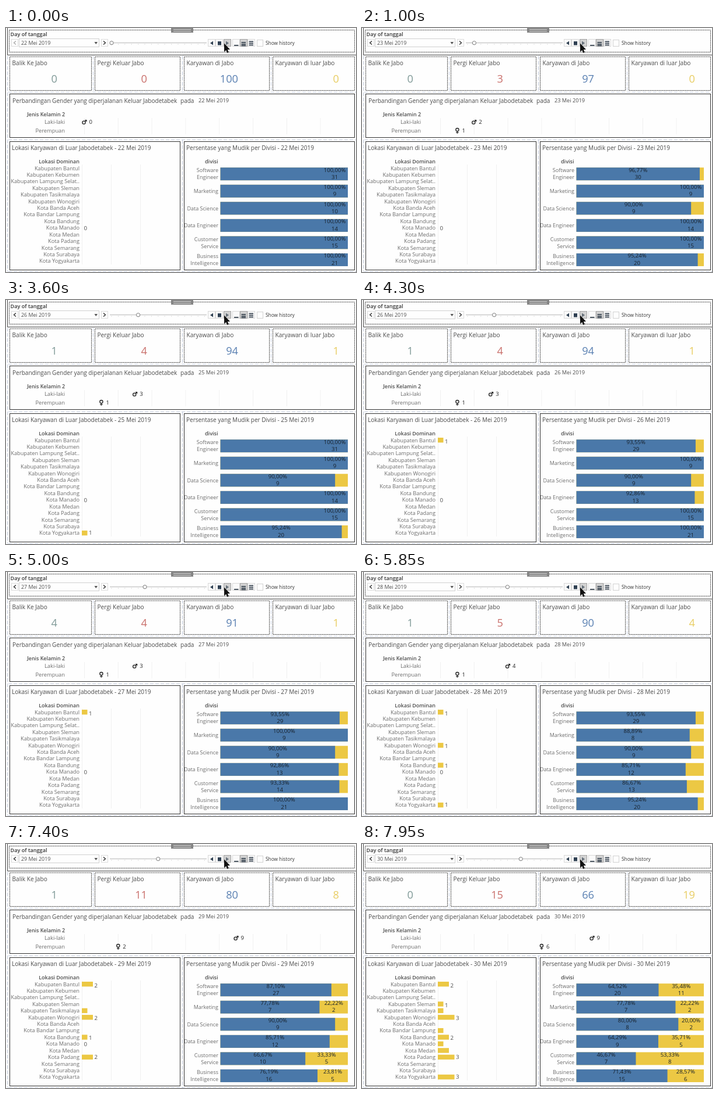
Write an HTML page with a canvas that moves like this. It is 600 by 420 pixels and loops after 8 s.

```html
<!DOCTYPE html>
<html lang="id">
<head>
<meta charset="utf-8">
<style>
html, body { margin: 0; width: 100%; height: 100%; overflow: hidden; background: #fefefe; }
canvas { display: block; }
</style>
</head>
<body>
<canvas id="stage" width="600" height="420"></canvas>
<script>
const ctx = document.getElementById('stage').getContext('2d');
const LOOP = 8000, DAY = 1010;
const BLUE = '#4a78a9', YELLOW = '#ecc844', INK = '#4b4b4b', LABEL = '#6c6c6c', DARK = '#222';

const places = ['Kabupaten Bantul', 'Kabupaten Kebumen', 'Kabupaten Lampung Selat..', 'Kabupaten Sleman',
  'Kabupaten Tasikmalaya', 'Kabupaten Wonogiri', 'Kota Banda Aceh', 'Kota Bandar Lampung', 'Kota Bandung',
  'Kota Manado', 'Kota Medan', 'Kota Padang', 'Kota Semarang', 'Kota Surabaya', 'Kota Yogyakarta'];
const MANADO = 9, UNLABELLED = [4, 7, 10];
const divisions = [['Software', 'Engineer'], ['Marketing'], ['Data Science'], ['Data Engineer'],
  ['Customer', 'Service'], ['Business', 'Intelligence']];
const staff = [31, 9, 10, 14, 15, 21];

// One entry per day: headline figures, travellers by gender, people per place, staff still in town.
const days = [
  { kpi: [0, 0, 100, 0], gender: [0], away: '000000000000000', stay: [31, 9, 10, 14, 15, 21] },
  { kpi: [0, 3, 97, 0], gender: [2, 1], away: '000000000000000', stay: [30, 9, 9, 14, 15, 20] },
  { kpi: [3, 2, 95, 0], gender: [1, 1], away: '000000000000000', stay: [31, 9, 9, 14, 14, 21] },
  { kpi: [1, 4, 94, 1], gender: [3, 1], away: '000000000000001', stay: [31, 9, 9, 14, 15, 20] },
  { kpi: [1, 4, 94, 1], gender: [3, 1], away: '100000000000000', stay: [29, 9, 9, 13, 15, 21] },
  { kpi: [4, 4, 91, 1], gender: [3, 1], away: '100000000000000', stay: [29, 9, 9, 13, 14, 21] },
  { kpi: [1, 5, 90, 4], gender: [4, 1], away: '100001001000001', stay: [29, 8, 9, 12, 13, 20] },
  { kpi: [1, 11, 80, 8], gender: [9, 2], away: '200012001002000', stay: [27, 7, 9, 12, 10, 16] },
  { kpi: [0, 15, 66, 19], gender: [9, 6], away: '200113012123003', stay: [20, 7, 8, 9, 7, 15] }
];
const kpis = [
  { title: 'Balik Ke Jabo', x: 6.5, w: 140, right: 88, color: '#809a98' },
  { title: 'Pergi Keluar Jabo', x: 152.5, w: 146, right: 242, color: '#c96f6b' },
  { title: 'Karyawan di Jabo', x: 305.5, w: 146, right: 398, color: '#5a80b2' },
  { title: 'Karyawan di luar Jabo', x: 457.5, w: 140, right: 571, color: '#e8cd62' }
];

const dateText = day => `${22 + day} Mei 2019`;

function text(value, x, middle, size, color = INK, align = 'left', weight = 400) {
  ctx.font = `${weight} ${size}px "Open Sans", "Noto Sans", sans-serif`;
  ctx.textAlign = align;
  ctx.fillStyle = color;
  ctx.fillText(value, x, middle + size * 0.36);
}
function rect(x, y, w, h, color) {
  ctx.fillStyle = color;
  ctx.fillRect(x, y, w, h);
}
function line(points, color, width = 1, dash = []) {
  ctx.beginPath();
  points.forEach(([x, y]) => ctx.lineTo(x, y));
  ctx.strokeStyle = color;
  ctx.lineWidth = width;
  ctx.setLineDash(dash);
  ctx.stroke();
  ctx.setLineDash([]);
}
function polygon(points, color) {
  ctx.beginPath();
  points.forEach(([x, y]) => ctx.lineTo(x, y));
  ctx.fillStyle = color;
  ctx.fill();
}
function frame(x, y, w, h, color = '#333', dash = []) {
  ctx.strokeStyle = color;
  ctx.lineWidth = 1;
  ctx.setLineDash(dash);
  ctx.strokeRect(x, y, w, h);
  ctx.setLineDash([]);
}
function ring(x, y, r, color, width) {
  ctx.beginPath();
  ctx.arc(x, y, r, 0, 7);
  ctx.strokeStyle = color;
  ctx.lineWidth = width;
  ctx.stroke();
}

function button(x, pressed) {
  rect(x, 19, 12, 13, pressed ? '#d2d2d2' : '#fafafa');
  frame(x + .5, 19.5, 12, 12, pressed ? '#a5a5a5' : '#d8d8d8');
}

function drawControls(day) {
  frame(5.5, 3.5, 592, 38, '#444', [2, 1]);
  line([[2.5, 0], [2.5, 46.5], [600, 46.5]], '#444');
  rect(283, 0, 38, 8, '#858585');
  line([[287, 2.5], [317, 2.5]], '#d5d5d5');
  line([[287, 5.5], [317, 5.5]], '#d5d5d5');
  text('Day of tanggal', 7.5, 11, 9.1, '#333', 'left', 600);

  frame(9.5, 19.5, 11, 12, '#dcdcdc');
  line([[17, 22.5], [13.5, 25.5], [17, 28.5]], day ? '#333' : '#aaa', 1.4);
  frame(22.5, 18.5, 137, 14, '#cfcfcf');
  text(dateText(day), 26, 25.5, 8.9);
  polygon([[151.5, 24], [157, 24], [154.2, 28]], '#555');
  frame(163.5, 19.5, 11, 12, '#dcdcdc');
  line([[167, 22.5], [170.5, 25.5], [167, 28.5]], '#333', 1.4);

  line([[178, 25.5], [344, 25.5]], '#c9c9c9', 1.3);
  for (let x = 181; x < 344; x += 11.4) line([[x, 27], [x, 29]], '#ddd');
  const knob = 181 + 11.4 * day;
  ctx.beginPath();
  ctx.arc(knob, 25.7, 3.1, 0, 7);
  ctx.fillStyle = '#fff';
  ctx.fill();
  ring(knob, 25.7, 3.1, '#777', 1);

  [346, 359, 373, 388, 401, 414].forEach(x => button(x, x === 373 || x === 401));
  polygon([[355, 22.5], [355, 29.5], [350, 26]], '#2f4052');
  rect(363, 23, 6, 6.5, '#2f4052');
  polygon([[377, 22.5], [377, 29.5], [382, 26]], '#66707a');
  [[391, [29]], [403.5, [24, 27, 29.5]], [416.5, [22.5, 25.5, 28.5]]].forEach(([x, rows]) =>
    rows.forEach(y => rect(x, y, 7.5, 1.7, '#333f4c')));
  frame(430.5, 20.5, 10, 11, '#d2d2d2');
  text('Show history', 445, 26, 8.3, '#333');

  polygon([[374, 26.5], [374, 41], [377.2, 38.2], [379.4, 43], [382, 41.8], [379.8, 37.2], [384, 37]], '#111');
}

function drawKpis(figures) {
  kpis.forEach(({ title, x, w, right, color }, i) => {
    frame(x, 49.5, w, 58, '#3c3c3c', [2, 1]);
    text(title, x + 4, 60.5, 10.1);
    text(figures[i], right, 87, 18.2, color, 'right');
  });
}

function drawGender(counts, day) {
  frame(6.5, 113.5, 591, 75);
  text('Perbandingan Gender yang diperjalanan Keluar Jabodetabek', 11, 125, 10);
  text('pada', 299, 125, 10);
  text(dateText(day), 382, 125, 9.2, INK, 'right');
  text('Jenis Kelamin 2', 101, 148.5, 8.9, INK, 'right', 600);
  for (let i = 0; i < 8; i++) line([[134.5 + 57.8 * i, 155], [134.5 + 57.8 * i, 183]], '#f1f1f1');
  ['Laki-laki', 'Perempuan'].forEach((name, i) => text(name, 101, 162 + 14.8 * i, 9.3, LABEL, 'right'));
  counts.forEach((count, i) => {
    const x = 134.5 + 28.9 * count, y = 162 + 14.8 * i;
    if (i === 0) {
      ring(x - 1, y + .7, 2.6, DARK, 1.3);
      line([[x + 1, y - 1], [x + 3.3, y - 3.3]], DARK, 1.2);
      line([[x + .8, y - 3.4], [x + 3.4, y - 3.4], [x + 3.4, y - .8]], DARK, 1.2);
    } else {
      ring(x, y - 1.7, 2.6, DARK, 1.3);
      line([[x, y + 1], [x, y + 5]], DARK, 1.2);
      line([[x - 2.3, y + 3], [x + 2.3, y + 3]], DARK, 1.2);
    }
    text(count, x + 8, y, 9.5, DARK);
  });
}

function drawPlaces(away, day) {
  frame(6.5, 195.5, 292, 221);
  text('Lokasi Karyawan di Luar Jabodetabek - ' + dateText(day), 10, 206, 10);
  text('Lokasi Dominan', 126, 229.5, 9, INK, 'right', 600);
  for (const x of [130.5, 180.5, 230.5]) line([[x, 235], [x, 407]], '#f1f1f1');
  places.forEach((place, i) => {
    const count = +away[i], y = 241.2 + 11.42 * i;
    text(place, 126, y, 9.2, LABEL, 'right');
    if (count) rect(130, y - 4.2, 9.5 * count, 8.4, YELLOW);
    const labelled = i === MANADO ? !count : count && !UNLABELLED.includes(i);
    if (labelled) text(count, count ? 132.5 + 9.5 * count : 133.5, 243.4 + 11.22 * i, 9.7, INK);
  });
}

function drawDivisions(stay, day) {
  frame(305.5, 195.5, 292, 221);
  text('Persentase yang Mudik per Divisi - ' + dateText(day), 309, 206, 10);
  text('divisi', 363.5, 230, 9.1, INK, 'right', 600);
  const left = 367.5, width = 218.5;
  divisions.forEach((lines, i) => {
    const y = 251.2 + 29.55 * i, share = stay[i] / staff[i], split = left + width * share;
    lines.forEach((part, j) => text(part, 364, y + 12 * (j - (lines.length - 1) / 2), 9, LABEL, 'right'));
    rect(left, y - 11, width, 22, YELLOW);
    rect(left, y - 11, width * share, 22, BLUE);
    const label = (part, count, x) => {
      text((part * 100).toFixed(2).replace('.', ',') + '%', x, y - 7, 9.6, '#17202a', 'center');
      text(count, x, y + 5.2, 9.6, '#17202a', 'center');
    };
    label(share, stay[i], share === 1 && day < 5 ? 563.5 : (left + split) / 2);
    if (1 - share > .199) label(1 - share, staff[i] - stay[i], (split + left + width) / 2);
  });
}

function drawGutters() {
  const guide = points => line(points, '#c3cbdc', 1, [6, 3]);
  [110.5, 192.5, 419.5].forEach(y => guide([[4, y], [600, y]]));
  guide([[302.5, 48], [302.5, 110]]);
  guide([[302.5, 193], [302.5, 419]]);
  [149.5, 454.5].forEach(x => guide([[x, 48], [x, 110]]));
  guide([[2.5, 48], [2.5, 419]]);
}

function draw() {
  const t = performance.now() % LOOP;
  const selected = Math.floor((t + 480) / DAY);
  const shown = Math.floor((t + 310) / DAY); // the charts follow the date control a little later
  const { kpi, gender, away, stay } = days[shown];
  rect(0, 0, 600, 420, '#fefefe');
  drawGutters();
  drawKpis(kpi);
  drawGender(gender, shown);
  drawPlaces(away, shown);
  drawDivisions(stay, shown);
  drawControls(selected);
  requestAnimationFrame(draw);
}
draw();
</script>
</body>
</html>
```
